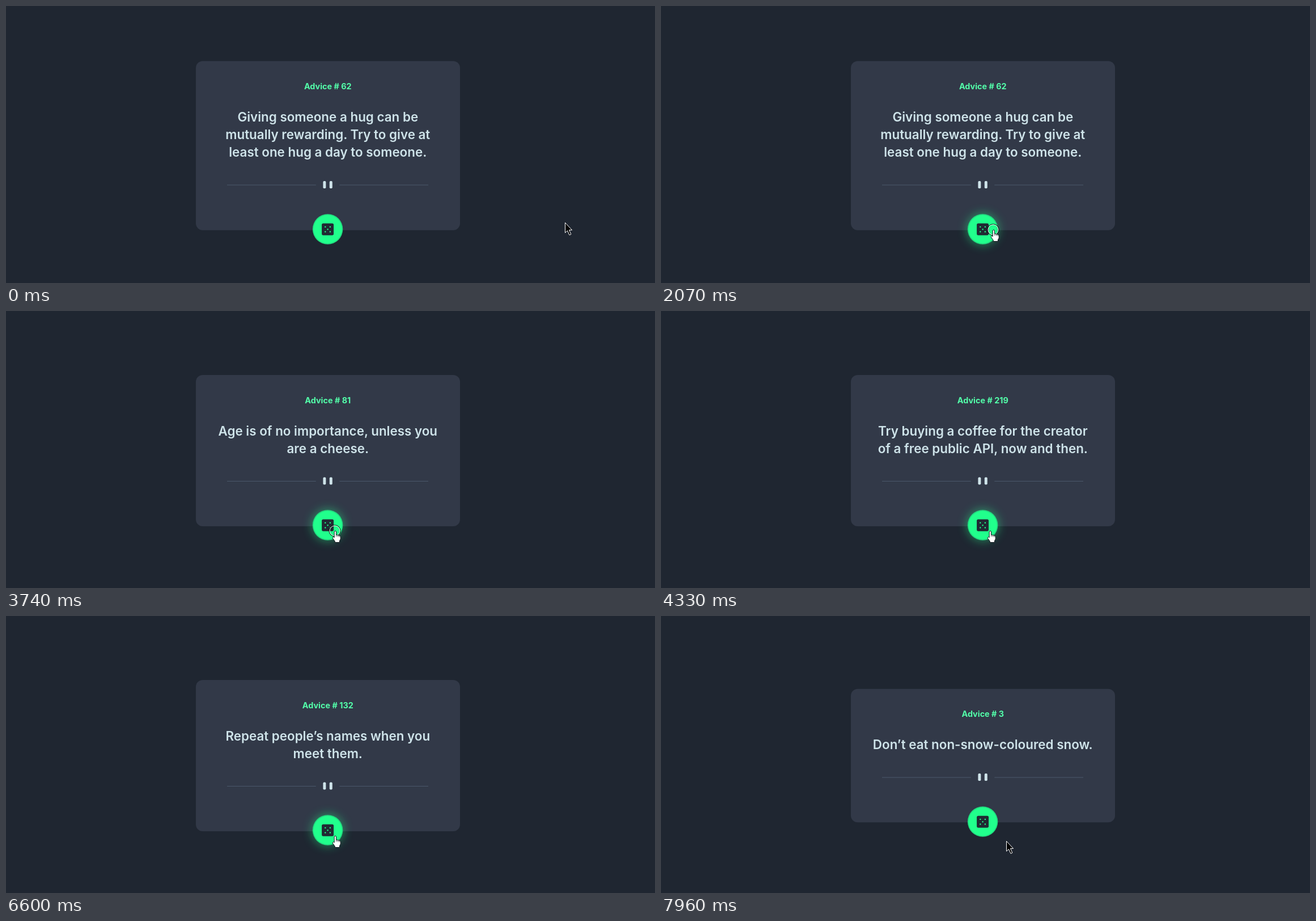
Write an HTML page that moves like this. It is 1145 px wide and 489 px high and loops after 7.99 s.

```html
<!DOCTYPE html>
<html lang="en">
<head>
<meta charset="utf-8">
<title>Advice generator</title>
<style>
  html, body { margin: 0; width: 100%; height: 100%; overflow: hidden; background: #1f2631; }
  svg { display: block; width: 100%; height: 100%; }
  text { font-family: Inter, "Open Sans", sans-serif; text-anchor: middle; }
  #title { font-size: 14.4px; font-weight: 700; fill: #53ffaa; }
  .line { font-size: 22.4px; font-weight: 600; fill: #cee3e9; }
</style>
</head>
<body>
<svg viewBox="0 0 1145 489">
  <defs>
    <filter id="blur" x="-150%" y="-150%" width="400%" height="400%">
      <feGaussianBlur stdDeviation="9"/>
    </filter>
  </defs>
  <rect width="1145" height="489" fill="#1f2631"/>
  <rect id="card" x="335" width="466" rx="12" fill="#323948"/>
  <text id="title" x="567.8"></text>
  <text class="line" x="567.8"></text>
  <text class="line" x="567.8"></text>
  <text class="line" x="567.8"></text>
  <g id="divider">
    <path d="M390 0H546.8M588.3 0H745" stroke="#4a586a"/>
    <rect x="559.4" y="-6.9" width="5" height="13" rx="1.8" fill="#cee3e9"/>
    <rect x="570.8" y="-6.9" width="5" height="13" rx="1.8" fill="#cee3e9"/>
  </g>
  <g id="button">
    <circle id="glow" r="27" fill="#21ff8c" filter="url(#blur)"/>
    <circle r="26.7" fill="#22dd80"/>
    <circle r="25" fill="#21ff8c"/>
    <rect x="-10.5" y="-10.3" width="21" height="21" rx="2.6" fill="#202a33"/>
    <path d="M-4.3-4.1h0M4.3-4.1h0M0 .2h0M-4.3 4.5h0M4.3 4.5h0"
      stroke="#21ff8c" stroke-width="2.4" stroke-linecap="round"/>
  </g>
  <g id="ring" fill="none">
    <circle r="10" stroke="#000"/>
    <circle r="9" stroke="#fff"/>
  </g>
  <path id="arrow" d="M.5 1.5V19.3L4.5 15.6 8 23.4 10.9 22 7.5 14.5H12.6Z"
    fill="#000" stroke="#fff" stroke-linejoin="round"/>
  <g id="hand">
    <path d="M-.8 2Q-.8.3.8.3 2.5.3 2.5 2V7L5.5 7.5 8.5 8.5Q10.2 9 10.2 11V14.5L8.5 18V20.5H.3V18.5L-3.4 13.5Q-4.1 11.4-2.5 10.8-1.7 10.7-.8 12Z"
      fill="#fff" stroke="#10151c" stroke-linejoin="round"/>
    <path d="M2.7 7V10.5M5.4 7.8V10.8M7.9 8.6V11.2" stroke="#10151c" stroke-width=".7"/>
  </g>
</svg>
<script>
const LOOP = 7990, HOVER_IN = 1450, HOVER_OUT = 7070, FADE = 300;

const ADVICE = [
  [0, 62, "Giving someone a hug can be", "mutually rewarding. Try to give at", "least one hug a day to someone."],
  [2670, 81, "Age is of no importance, unless you", "are a cheese."],
  [4330, 219, "Try buying a coffee for the creator", "of a free public API, now and then."],
  [5470, 132, "Repeat people’s names when you", "meet them."],
  [6800, 3, "Don’t eat non-snow-coloured snow."]
];

// Pointer tip: time, x, y
const PATH = [
  [390, 986, 381], [740, 838, 403], [1020, 722, 411], [1160, 668, 405], [1230, 642, 404],
  [1440, 592, 401], [1860, 586, 395], [3050, 586, 395], [3190, 580, 388],
  [7002, 580, 388], [7206, 598, 394], [7410, 612, 398], [7959, 612, 398], [7960, 609, 396]
];

const CLICKS = [[2070, 2140], [3740, 3800], [5200, 5340], [6530, 6600]];

const $ = id => document.getElementById(id);
const lines = document.querySelectorAll(".line");
const clamp = v => Math.max(0, Math.min(1, v));
const move = (id, x, y) => $(id).setAttribute("transform", `translate(${x} ${y})`);
const show = (id, on) => $(id).setAttribute("visibility", on ? "visible" : "hidden");

// The pointer is sampled about 14 times a second
function sample(t) {
  if (t >= 7960) return t;
  const [start, step] = t < HOVER_OUT ? [460, 70] : [HOVER_OUT, 68];
  return start + step * Math.floor((t - start) / step);
}

function pointer(t) {
  const i = PATH.findIndex(p => p[0] > t);
  if (i === 0) return PATH[0].slice(1);
  if (i < 0) return PATH[PATH.length - 1].slice(1);
  const [a, b] = [PATH[i - 1], PATH[i]];
  const k = (t - a[0]) / (b[0] - a[0]);
  return [1, 2].map(n => Math.round(a[n] + (b[n] - a[n]) * k));
}

function drawCard(t) {
  const [, id, ...rows] = ADVICE.filter(a => a[0] <= t).pop();
  const missing = 3 - rows.length, shift = 15.68 * missing;
  $("card").setAttribute("y", 97.3 + shift);
  $("card").setAttribute("height", 298.4 - 2 * shift);
  $("title").textContent = `Advice # ${id}`;
  $("title").setAttribute("y", Math.floor(147.4 + shift));
  lines.forEach((line, i) => {
    line.textContent = rows[i] || "";
    line.setAttribute("y", Math.floor(204.4 + shift) + 31 * i);
  });
  move("divider", 0, 316 - 15.5 * missing);
  move("button", 567.6, Math.round(394 - shift));
}

function render(t) {
  drawCard(t);
  const s = sample(t);
  const [x, y] = pointer(s);
  const hover = t >= HOVER_IN && t < HOVER_OUT;
  const fadeIn = clamp((s - HOVER_IN + 70) / FADE);
  const fadeOut = clamp((s - HOVER_OUT + 68) / FADE);
  $("glow").setAttribute("opacity", 0.5 * fadeIn * (1 - (t < HOVER_OUT ? 0 : fadeOut)));
  for (const id of ["arrow", "hand", "ring"]) move(id, x, y);
  show("arrow", !hover);
  show("hand", hover);
  show("ring", CLICKS.some(([a, b]) => t >= a && t < b));
}

const begin = performance.now();
function tick(now) {
  render(Math.max(0, now - begin) % LOOP);
  requestAnimationFrame(tick);
}
tick(begin);
</script>
</body>
</html>
```
